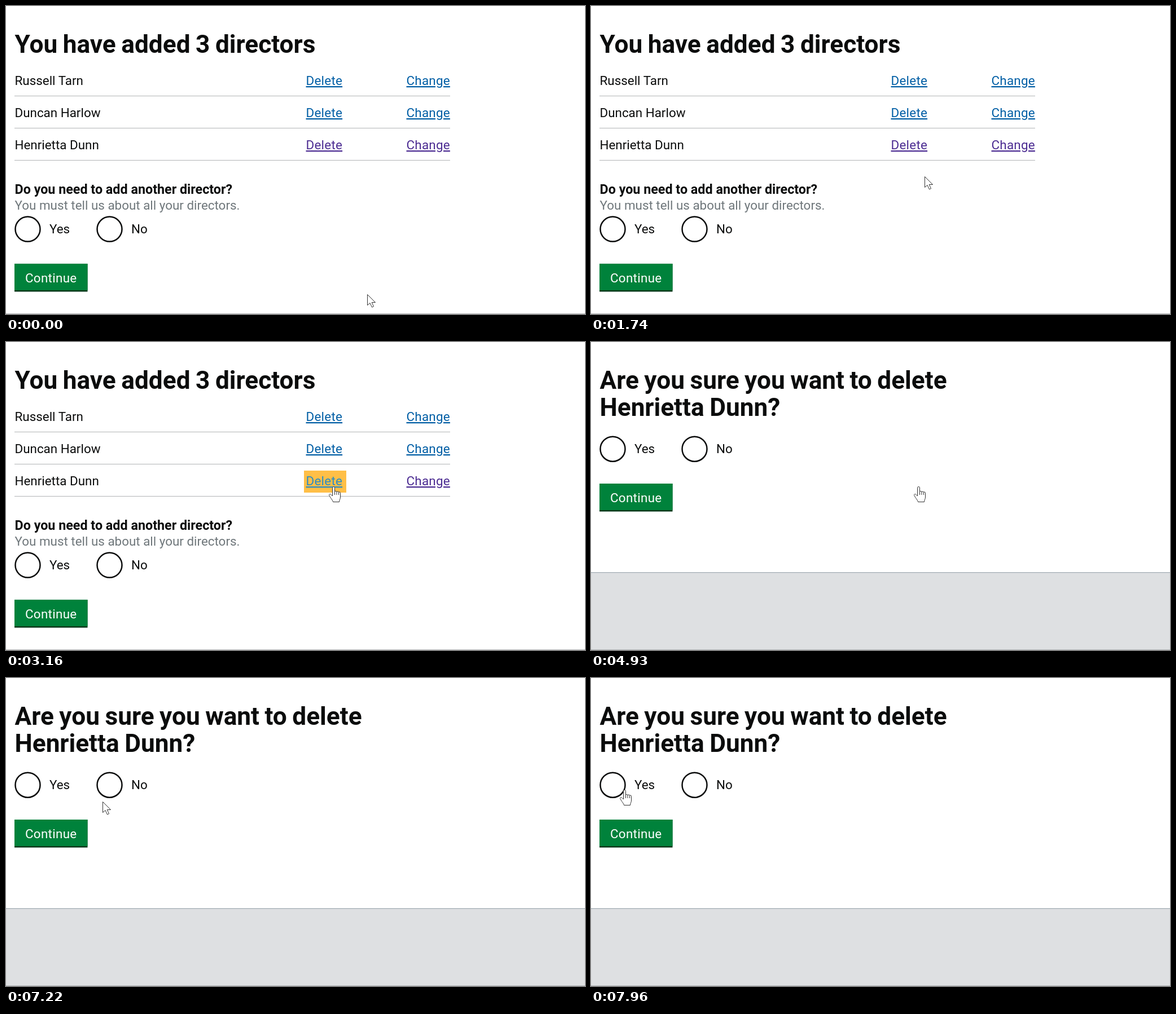
An HTML page for the animation above (8000 ms loop, 1026 by 546 pixels).

```html
<!DOCTYPE html>
<html lang="en">
<head>
<meta charset="utf-8">
<title>Delete a director</title>
<style>
  html, body { margin: 0; width: 100%; height: 100%; overflow: hidden; background: #fff; }
  svg { display: block; width: 1026px; height: 546px; }
  text { font: 22.4px Roboto, "Noto Sans", sans-serif; fill: #0b0c0c; }
  .title { font-size: 44.2px; font-weight: 700; word-spacing: -1.5px; }
  .question { font-size: 23.3px; font-weight: 700; }
  .hint { fill: #6f777b; }
  .link { fill: #005ea5; letter-spacing: .25px; text-decoration: underline; text-decoration-thickness: 1.5px; text-underline-offset: 2.5px; }
  .visited { fill: #4c2c92; }
  .hover { fill: #2b8cc4; }
  .label { fill: #fff; letter-spacing: .3px; }
  .radio { fill: #fff; stroke: #0b0c0c; stroke-width: 2.5; }
  .rule { fill: #b1b4b6; }
  .cursor { fill: #fff; stroke: #333; stroke-linejoin: round; }
</style>
</head>
<body>
<svg viewBox="0 0 1026 546">
  <g id="list"></g>
  <g id="confirm"></g>
  <rect class="rule" y="545" width="1026" height="1"/>
  <path id="arrow" class="cursor" d="M.5 .5V19.5L5 15.5L8.5 23L11.5 21.6L8.2 14.5H14.5Z"/>
  <path id="hand" class="cursor" d="M-1.5 17V2.5a2 2 0 0 1 4 0V9.5Q2.5 8.5 4.3 8.5T6 10Q6 9 7.8 9T9.5 10.5Q9.5 10 11 10T12.5 11.5V19C12.5 23 10.5 23.5 10.5 27.5H-.5C-.8 25-3 23-4.5 20.5L-7 16.5C-8.5 14-5.5 12.5-4 14.5L-1.5 17M2.5 9.5V15M6 10V15M9.5 10.5V15"/>
</svg>
<script>
const LOOP = 8000, HOVER = 2340, FOCUS = 3160, CONFIRM = 4930;
const $ = id => document.getElementById(id);

const text = (x, y, words, cls = "", id = "") =>
  `<text x="${x}" y="${y}" class="${cls}" id="${id}">${words}</text>`;
const rect = (x, y, w, h, fill) =>
  `<rect x="${x}" y="${y}" width="${w}" height="${h}" fill="${fill}"/>`;
const radio = (x, y, words) =>
  `<circle class="radio" cx="${x}" cy="${y}" r="22"/>` + text(x + 38.5, y + 7.5, words);

// Yes/No choice with the button below it
const form = y => radio(38.5, y, "Yes") + radio(183.5, y, "No") +
  rect(15, y + 61.3, 129.5, 49.5, "#003618") + rect(15, y + 61.3, 129.5, 47, "#00823b") +
  text(34, y + 94.5, "Continue", "label");

const people = ["Russell Tarn", "Duncan Harlow", "Henrietta Dunn"];
const row = (name, i) => {
  const y = 140 + i * 57, cls = i === 2 ? "link visited" : "link";
  return text(15.5, y, name) + text(531.5, y, "Delete", cls, "delete" + i) +
    text(709.5, y, "Change", cls) + `<rect class="rule" x="15" y="${y + 19}" width="772" height="1"/>`;
};

$("list").innerHTML = text(15.5, 82.5, "You have added 3 directors", "title") +
  `<rect id="focus" x="528" y="228" width="75" height="39" fill="#ffbf47"/>` +
  people.map(row).join("") +
  text(15.5, 333, "Do you need to add another director?", "question") +
  text(15.5, 361, "You must tell us about all your directors.", "hint") + form(395.6);

$("confirm").innerHTML = text(15.5, 82.5, "Are you sure you want to delete", "title") +
  text(15.5, 130.5, people[2] + "?", "title") + form(189.7) +
  rect(0, 408, 1026, 138, "#dee0e2") + rect(0, 408, 1026, 1.2, "#a1acb2");

const linear = k => k;
const settle = k => { const e = 1 - (1 - k) ** 1.6; return e * e * (3 - 2 * e); };

// Each leg moves the pointer in a few discrete steps, starting where the last one ended
const legs = [
  { start: 0, end: 0, steps: 1, x: 640, y: 511 },
  { start: 1150, end: 1950, steps: 11, x: 589, y: 293, ease: settle },
  { start: 2030, end: 2170, steps: 3, x: 572, y: 258 },
  { start: 2340, end: 2420, steps: 2, x: 580, y: 256, hand: true },
  { start: 6390, end: 6390, steps: 1, x: 555, y: 263, hand: true },
  { start: 6490, end: 6910, steps: 5, x: 180, y: 218, ease: settle, dip: 26 },
  { start: 7220, end: 7220, steps: 1, x: 171, y: 219 },
  { start: 7320, end: 7420, steps: 2, x: 114, y: 211 },
  { start: 7530, end: 7530, steps: 1, x: 86, y: 205, hand: true },
  { start: 7700, end: 7960, steps: 4, x: 59, y: 198, hand: true }
];

function pointer(t) {
  const i = legs.findLastIndex(leg => t >= leg.start);
  const leg = legs[i], from = legs[i - 1] || leg;
  const { start, end, steps, ease = linear, dip = 0 } = leg;
  const done = end > start ? Math.floor((t - start) / (end - start) * (steps - 1) + 1e-6) + 1 : 1;
  const k = ease(Math.min(1, done / steps));
  return {
    x: Math.round(from.x + (leg.x - from.x) * k),
    y: Math.round(from.y + (leg.y - from.y) * k + dip * Math.sin(Math.PI * k)),
    hand: leg.hand
  };
}

const show = (id, on) => $(id).style.display = on ? "" : "none";

function draw(now) {
  const t = now % LOOP, p = pointer(t);
  show("list", t < CONFIRM);
  show("confirm", t >= CONFIRM);
  show("focus", t >= FOCUS);
  $("delete2").classList.toggle("hover", t >= HOVER);
  show("hand", p.hand);
  show("arrow", !p.hand);
  $(p.hand ? "hand" : "arrow").setAttribute("transform", `translate(${p.x} ${p.y})`);
}

const began = performance.now();
function tick() {
  draw(performance.now() - began);
  requestAnimationFrame(tick);
}
tick();
</script>
</body>
</html>
```
